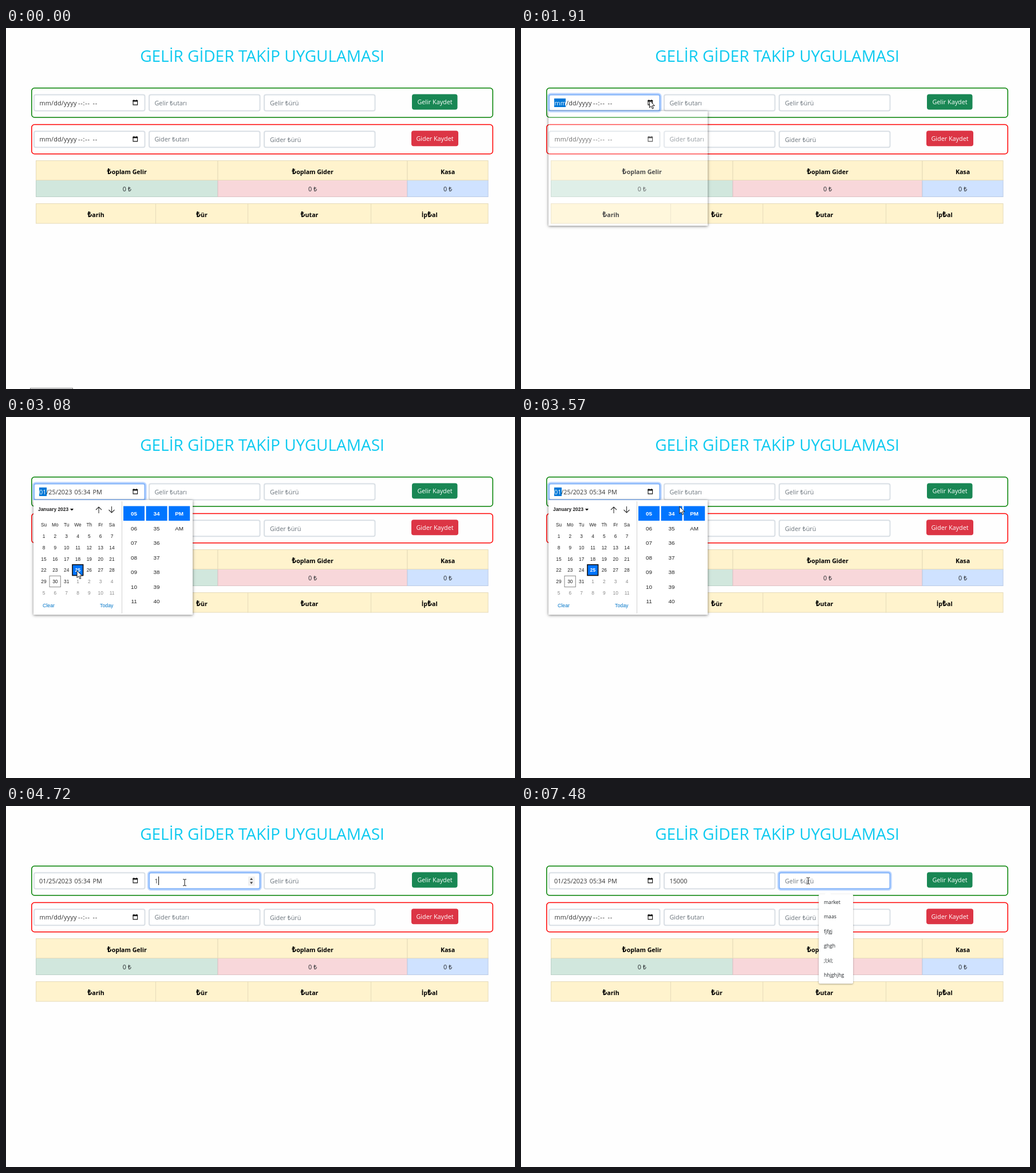
An HTML page that plays this animation: 889 by 630 pixels, repeating every 8000 ms.

```html
<!DOCTYPE html>
<html lang="tr">
<head>
<meta charset="utf-8">
<title>Gelir Gider Takip</title>
<style>
html, body { margin: 0; width: 100%; height: 100%; overflow: hidden; background: #fefefe; }
svg, div { position: absolute; left: 0; top: 0; }
text { font: 10.8px "Open Sans", "Noto Sans", sans-serif; fill: #212529; white-space: pre; }
.mid { text-anchor: middle; }
.title { font-size: 28px; font-weight: 500; fill: #0dcaf0; }
.btn { fill: #fff; }
.hint { fill: #6c757d; }
.head { font-size: 10.6px; font-weight: 700; fill: #000; }
.head tspan { font-size: 14px; }
.val { fill: #333; }
.cal text { font: 8.4px "Liberation Sans", Arial, sans-serif; fill: #222; }
.cal .bold { font-weight: 700; }
.cal .out { fill: #8a8a8a; }
.cal .link { font-size: 8.8px; fill: #0075c8; }
.cal .time { font-size: 9.9px; }
.cal .on { fill: #fff; font-weight: 700; }
.item { font-size: 8.7px; }
#pick { left: 48px; top: 145px; width: 278px; height: 200px; box-shadow: 0 1px 5px rgba(0,0,0,.5); }
#list { left: 520px; top: 154px; width: 60px; height: 156px; background: #fff; border-radius: 2px; box-shadow: 0 1px 3px rgba(0,0,0,.35); }
</style>
</head>
<body>
<svg id="base" width="889" height="630"></svg>
<div id="pick"></div>
<div id="list"></div>
<svg id="top" width="889" height="630"></svg>
<script>
const LOOP = 8000;
const $ = id => document.getElementById(id);
const text = (x, y, s, cls = '', more = '') => `<text x="${x}" y="${y}" class="${cls}" ${more}>${s}</text>`;
const rect = (x, y, w, h, more) => `<rect x="${x}" y="${y}" width="${w}" height="${h}" ${more}/>`;
const path = (d, more = '') => `<path d="${d}" ${more}/>`;
const group = (id, body, more = '') => `<g id="${id}" ${more}>${body}</g>`;

const COLS = [49, 250, 451];          // left edges of the inputs
const field = (x, y) => rect(x, y, 193.5, 28, 'rx="3" fill="#fff" stroke="#d9dfe5" stroke-width="2"');
const emptyDate = (y, first = '') =>
  text(58.5, y, `<tspan ${first}>mm</tspan>/dd/yyyy`, 'val', 'letter-spacing=".2"') +
  text(126, y, '--:--', 'val', 'letter-spacing=".8"') + text(151.5, y, '--', 'val', 'letter-spacing=".8"');
const icon = y => path(`M222 ${y + 1.5}h7.6v7.6h-7.6z`, 'fill="none" stroke="#111" stroke-width="1.1"') +
  path(`M221.5 ${y + 1}h8.6v2.4h-8.6zM222.8 ${y}h1.2v2h-1.2zM227.6 ${y}h1.2v2h-1.2z`, 'fill="#111"');

function formRow(y, line, word, btn, bx, bw) {
  return rect(44.8, y, 805.4, 51.2, `rx="5" fill="none" stroke="${line}" stroke-width="1.5"`) +
    COLS.map(x => field(x, y + 11.8)).join('') + icon(y + 20.3) +
    text(461, y + 30, word + ' ₺ürü', 'hint') +
    rect(bx, y + 10.8, bw, 27, `rx="4" fill="${btn}"`) +
    text(749, y + 28.3, word + ' Kaydet', 'btn mid');
}
function cells(y, h, edges, fills, lines, labels, cls, base) {
  return labels.map((s, i) => {
    const x = edges[i], w = edges[i + 1] - x;
    return rect(x, y, w, h, `fill="${fills[i % fills.length]}" stroke="${lines[i % lines.length]}"`) +
      text(x + w / 2, base, cls ? s.replace('₺', '<tspan>₺</tspan>') : s, cls + ' mid');
  }).join('');
}
const ring = i => group('ring' + i,
  rect(COLS[i] - 1.8, 114.7, 197.1, 31.6, 'rx="5" stroke="#0d6efd" stroke-opacity=".25" stroke-width="3"') +
  rect(COLS[i], 116.5, 193.5, 28, 'rx="3" stroke="#86b7fe" stroke-width="2"'), 'fill="none"');

const sums = [52.5, 370, 701, 842], list = [52.5, 261.5, 422.5, 637.5, 842];
$('base').innerHTML =
  text(447.5, 59, 'GELİR GİDER TAKİP UYGULAMASI', 'title mid') +
  formRow(104.7, 'green', 'Gelir', '#198754', 709, 79.5) +
  formRow(168.5, 'red', 'Gider', '#dc3545', 708, 82) +
  emptyDate(198.3) + text(259.5, 198.3, 'Gider ₺utarı', 'hint') +
  cells(265.5, 29, sums, ['#d1e7dd', '#f8d7da', '#cfe2ff'], ['#bcd0c7', '#dfc2c4', '#bacbe6'], ['0 ₺', '0 ₺', '0 ₺'], '', 285) +
  cells(231.5, 34, sums, ['#fff3cd'], ['#e6dbb9'], ['₺oplam Gelir', '₺oplam Gider', 'Kasa'], 'head', 255) +
  cells(306.5, 34.5, list, ['#fff3cd'], ['#e6dbb9'], ['₺arih', '₺ür', '₺utar', 'İp₺al'], 'head', 330) +
  rect(42.5, 628.5, 74, 10, 'id="tip" fill="#f4f4f4" stroke="#888"') +
  ring(0) + ring(1) + ring(2) +
  rect(58, 123, 20, 15, 'id="mark" fill="#0078d7"') +
  group('noDate', emptyDate(134.5, 'id="mm"')) +
  group('date', text(58, 134.5, '<tspan id="month">01</tspan>/25/2023', 'val') +
    text(119.5, 134.5, '05:34', 'val') + text(151.5, 134.5, 'PM', 'val')) +
  text(259.5, 134.5, '', '', 'id="amount"') +
  group('spin', rect(423, 123, 11.5, 16, 'fill="#f0f0f0"') +
    path('M426 129l2.6-3.6 2.6 3.6zM426 132.6l2.6 3.6 2.6-3.6z', 'fill="#444"')) +
  rect(0, 123, 1, 15, 'id="caret" fill="#000"');

function calendar() {
  const step = 19.83;
  let s = text(56, 164.3, 'January 2023', 'bold') + path('M112 160h6l-3 3.4z') +
    path('M162 168v-11m-5 5l5-5 5 5M184.5 156v11m-5-5l5 5 5-5', 'fill="none" stroke="#333" stroke-width="1.1"') +
    rect(76, 277.3, 19.3, 19.3, 'fill="none" stroke="#888"') +
    rect(116, 257.7, 18.6, 18.8, 'id="pickDay" fill="#0075ff" stroke="#101010" stroke-width="1.6"');
  'Su Mo Tu We Th Fr Sa'.split(' ').forEach((d, i) => s += text(66 + i * step, 190.5, d, 'mid'));
  for (let i = 0; i < 42; i++)
    s += text(66 + i % 7 * step, 211 + Math.floor(i / 7) * step, i < 31 ? i + 1 : i - 30,
      i < 31 ? 'mid' : 'mid out', i == 24 ? 'id="day"' : '');
  s += text(64, 332, 'Clear', 'link') + text(164, 332, 'Today', 'link') + rect(202, 147, 1, 196, 'fill="#d0d0d0"');
  [[5, 7], [34, 7], ['PM', 'AM']].forEach((c, i) => {
    const x = 205 + i * 39.6;
    s += rect(x, 155.5, 37, 25.5, 'fill="#0075ff"');
    for (let r = 0; r < (i < 2 ? 7 : 2); r++)
      s += text(x + 18.5, 172 + r * 25.5, i < 2 ? String(c[0] + r).padStart(2, '0') : c[r], r ? 'time mid' : 'time mid on');
  });
  return s;
}
$('top').innerHTML = group('cal', calendar(), 'class="cal"') +
  group('items', path('M530 154.5l6-6 6 6z', 'fill="#fff"') +
    ['market', 'maas', 'fjfgj', 'ghgh', ';l;kl;', 'hhjghjhg'].map((s, i) => text(529, 170.7 + i * 25.5, s, 'item')).join('')) +
  group('mouse', '<circle id="halo" r="8" fill="#ffe93b" fill-opacity=".75"/>' +
    path('M0 0v12.5l2.9-2.7 2 4.6 2-.9-2-4.4h4z', 'id="arrow" fill="#fff" stroke="#000" stroke-width=".9"') +
    path('M-3-5.5h2.2l.8.7.8-.7h2.2M0-5v10M-3 5.5h2.2l.8-.7.8.7h2.2', 'id="beam" fill="none" stroke="#111" stroke-width="1"'));

// pointer route: time, x, y
const ROUTE = [[190, 90, 632], [530, 370, 353], [730, 370, 353], [930, 421, 330], [1490, 224.5, 126.5],
  [1950, 224.5, 126.5], [2360, 112, 286], [2850, 124, 268], [3170, 124, 268], [3720, 310.5, 131.5],
  [4030, 310.5, 131.5], [4130, 312, 133.5], [6270, 312, 133.5], [6660, 496.5, 119.5], [6860, 500.5, 130],
  [7080, 500.5, 130], [7150, 501.5, 130.5], [LOOP, 501.5, 130.5]];
const KEYS = [4720, 4920, 5250, 5650, 5780];
const CLICKS = [1500, 2870, 3700, 6860];

const ramp = (t, from, dur) => Math.min(1, Math.max(0, (t - from) / dur));
const within = (t, a, b) => t >= a && t < b;
const show = (id, on) => $(id).style.visibility = on ? 'visible' : 'hidden';
const fade = (id, o) => $(id).style.opacity = o;

function pointer(t) {
  const i = Math.max(1, ROUTE.findIndex(p => p[0] > t));
  const [t0, x0, y0] = ROUTE[i - 1], [t1, x1, y1] = ROUTE[i];
  const k = ramp(t, t0, t1 - t0), e = k * k * (3 - 2 * k);
  return [x0 + (x1 - x0) * e, y0 + (y1 - y0) * e];
}

function draw(t) {
  const chosen = t >= 2900, open = within(t, 1850, 3730);
  show('tip', t < 190);

  fade('ring0', ramp(t, 1540, 150) - ramp(t, 3790, 140));
  fade('ring1', ramp(t, 3790, 140) - ramp(t, 6870, 150));
  fade('ring2', ramp(t, 6870, 150));

  show('noDate', !chosen);
  show('date', chosen);
  const marked = within(t, 1540, 3730);
  show('mark', marked);
  $('mark').setAttribute('width', chosen ? 13 : 20);
  $('mm').style.fill = $('month').style.fill = marked ? '#fff' : '';

  show('pick', open);
  $('pick').style.background = `rgba(255,255,255,${ramp(t, 1860, 170)})`;
  fade('cal', open ? ramp(t, 1950, 100) : 0);
  show('pickDay', chosen);
  $('day').setAttribute('class', chosen ? 'mid on' : 'mid');

  const typed = '15000'.slice(0, KEYS.filter(k => t >= k).length);
  $('amount').textContent = typed || 'Gelir ₺utarı';
  $('amount').setAttribute('class', typed ? 'val' : 'hint');
  show('caret', within(t, 3750, 4390) || within(t, 4720, 6310) || within(t, 6880, 7480));
  $('caret').setAttribute('x', t > 6870 ? 461 : 260 + typed.length * 6.1);

  const [x, y] = pointer(t);
  const overInput = (within(x, 249, 445) || within(x, 450, 646)) && (within(y, 115, 146) || within(y, 179, 210));
  show('spin', within(t, 3730, 6880));
  $('mouse').setAttribute('transform', `translate(${x} ${y})`);
  show('arrow', t >= 190 && !overInput);
  show('beam', t >= 190 && overInput);
  show('halo', CLICKS.some(c => within(t, c, c + 130)));

  const menu = ramp(t, 6940, 100);
  fade('list', menu);
  fade('items', menu);
}

const start = performance.now();
function tick() {
  draw((performance.now() - start) % LOOP);
  requestAnimationFrame(tick);
}
tick();
</script>
</body>
</html>
```
